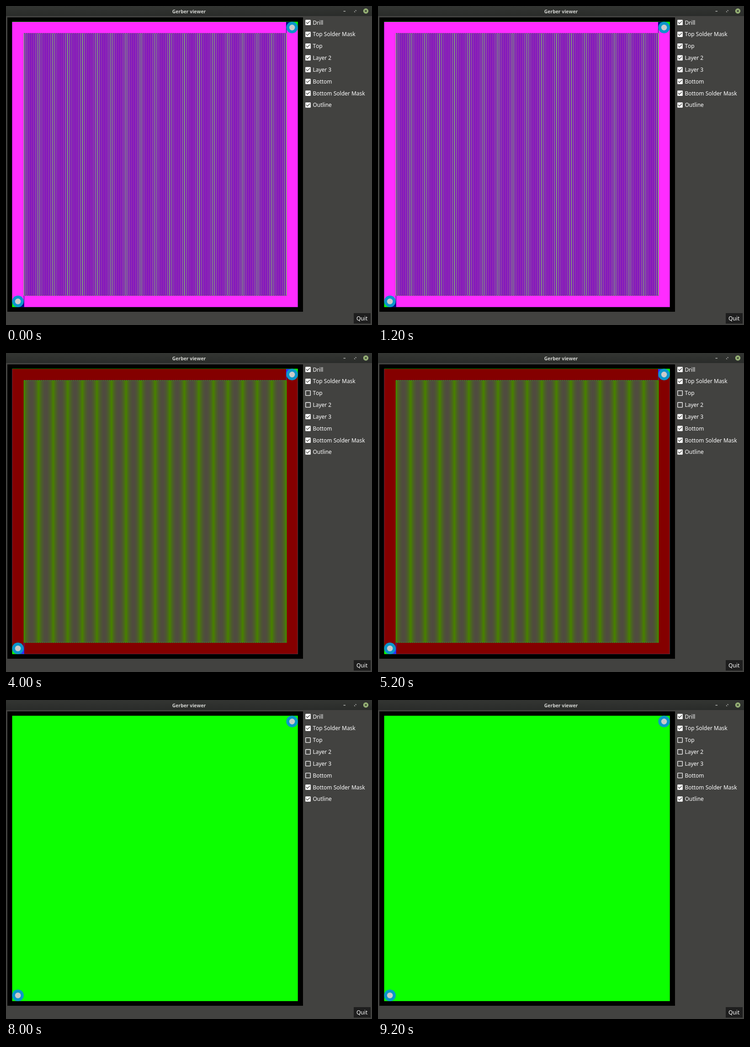
An HTML page that plays this animation: 801x699 px, repeating every 10 s.

```html
<!DOCTYPE html>
<html lang="en">
<head>
<meta charset="utf-8">
<title>Gerber viewer</title>
<style>
  html, body { margin: 0; width: 100%; height: 100%; overflow: hidden; background: #424240; }
  svg { display: block; width: 801px; height: 699px; }
  text { font: 12px "Noto Sans", "Open Sans", sans-serif; font-kerning: none; fill: #fff; }
  .title { font-weight: 700; font-size: 10.4px; fill: #d3d4d1; }
</style>
</head>
<body>
<svg viewBox="0 0 801 699" xmlns="http://www.w3.org/2000/svg">
  <defs id="defs">
    <linearGradient id="bar" x2="0" y2="1">
      <stop stop-color="#333532"/><stop offset="1" stop-color="#2a2c2a"/>
    </linearGradient>
  </defs>
  <rect width="801" height="699" fill="#424240"/>
  <rect width="801" height="22" fill="url(#bar)"/>
  <text class="title" x="400.5" y="15.5" text-anchor="middle">Gerber viewer</text>
  <path d="M738.5 11.5h4.5" stroke="#c4c5c2" stroke-width="1.3"/>
  <path d="M763.8 9h2.7v2.7zM762 10.8v2.7h2.7z" fill="#b5b6b3"/>
  <circle cx="787.5" cy="11" r="5.7" fill="#98b477"/>
  <path d="M785.4 8.9l4.2 4.2m0-4.2l-4.2 4.2" stroke="#2b2d2a" stroke-width="1.3"/>
  <rect x="3" y="25" width="647" height="645"/>
  <rect x="13.5" y="34.5" width="625.2" height="625.3" fill="#0cff00"/>
  <g id="copper"></g>
  <g id="pads"></g>
  <g id="options"></g>
  <rect x="761" y="673" width="37" height="23" fill="#1e1e1e"/>
  <text x="767" y="689">Quit</text>
</svg>
<script>
const NS = "http://www.w3.org/2000/svg";
const $ = id => document.getElementById(id);

function add(parent, tag, attrs, text) {
  const el = document.createElementNS(NS, tag);
  for (const key in attrs) el.setAttribute(key, attrs[key]);
  if (text) el.textContent = text;
  parent.appendChild(el);
  return el;
}

const LEFT = 39.5, RIGHT = 613.5, TOP = 60, BOTTOM = 634.2;
const CYCLES = 139;
const PITCH = (RIGHT - LEFT) / CYCLES / 2;   // spacing of neighbouring gaps
const HOLD = 2000;
const BOARD = { x: 13.3, y: 34.5, width: 625.4, height: 625.3 };

// sparse layers have a vertical gap at every other trace only
const layers = [
  { fill: "#ff2cff" },
  { fill: "#000084", sparse: true },
  { fill: "#840000" },
  { fill: "#2c2cff" }
];

function meander(sparse) {
  let d = `M${LEFT} ${BOTTOM}`;
  for (let i = 0; i < CYCLES; i++) {
    const x = LEFT + i * 2 * PITCH, next = x + PITCH;
    d += `V${TOP}H${next}` + (sparse ? `M${next} ${BOTTOM}` : `V${BOTTOM}`) + `h${PITCH}`;
  }
  return d + `V${TOP}`;
}

// both pads are open at the board corner and on one alternating side
function padOpenings(odd) {
  const corners = "M626 34h13v13h-13zM13 647h13v13h-13z";
  return corners + (odd
    ? "M626 47h13v13.5h-13zM613 59.7h26v.8h-26zM13 633.7h13v13.5h-13zM13 633.7h26v.8h-26z"
    : "M613 34h13v13h-13zM613 34h.9v26h-.9zM26 647h13.5v13h-13.5zM38.9 634h.9v26h-.9z");
}

function drawCopper({ fill, sparse }, i) {
  const mask = add($("defs"), "mask", { id: "gaps" + i, maskUnits: "userSpaceOnUse", ...BOARD });
  add(mask, "rect", { ...BOARD, fill: "#fff" });
  add(mask, "path", {
    d: meander(sparse), fill: "none", stroke: "#000",
    "stroke-width": PITCH / 2, "stroke-linecap": "square"
  });
  add(mask, "path", { d: padOpenings(i % 2) });
  const plane = add($("copper"), "rect", { ...BOARD, fill, mask: `url(#gaps${i})` });
  $("copper").prepend(plane);
  return plane;
}

function drawOption(label, i) {
  const y = 36.2 + i * 25.83;
  const g = add($("options"), "g", {});
  const icon = add(g, "g", { transform: `translate(653.2 ${y - 7.8}) scale(.65)` });
  const box = "M19 3H5a2 2 0 0 0-2 2v14a2 2 0 0 0 2 2h14a2 2 0 0 0 2-2V5a2 2 0 0 0-2-2z";
  const paint = { fill: "#fff", "fill-rule": "evenodd" };
  const off = add(icon, "path", { d: box + "M5 5h14v14H5z", ...paint });
  const on = add(icon, "path", {
    d: box + "M10 17l-5-5 1.41-1.41L10 14.17l7.59-7.59L19 8z", ...paint
  });
  add(g, "text", { x: 671.4, y: y + 4.4 }, label);
  return { on, off };
}

const copper = layers.map(drawCopper);
for (const [cx, cy] of [[626.1, 47.1], [26.1, 647.3]]) {
  add($("pads"), "circle", { cx, cy, r: 12.7, fill: "#0b96cb" });
  add($("pads"), "circle", { cx, cy, r: 6.3, fill: "#cacaca" });
}
const options = ["Drill", "Top Solder Mask", "Top", "Layer 2", "Layer 3",
  "Bottom", "Bottom Solder Mask", "Outline"].map(drawOption);

const show = (el, visible) => el.setAttribute("display", visible ? "inline" : "none");
let current = -1;

function render(time) {
  const step = Math.floor(time / HOLD) % 5;
  if (step === current) return;
  current = step;
  copper.forEach((plane, i) => show(plane, i >= step));
  options.forEach(({ on, off }, i) => {
    const checked = i < 2 || i > 5 || i - 2 >= step;
    show(on, checked);
    show(off, !checked);
  });
}

const start = performance.now();
function tick() {
  render(performance.now() - start);
  requestAnimationFrame(tick);
}
tick();
</script>
</body>
</html>
```
